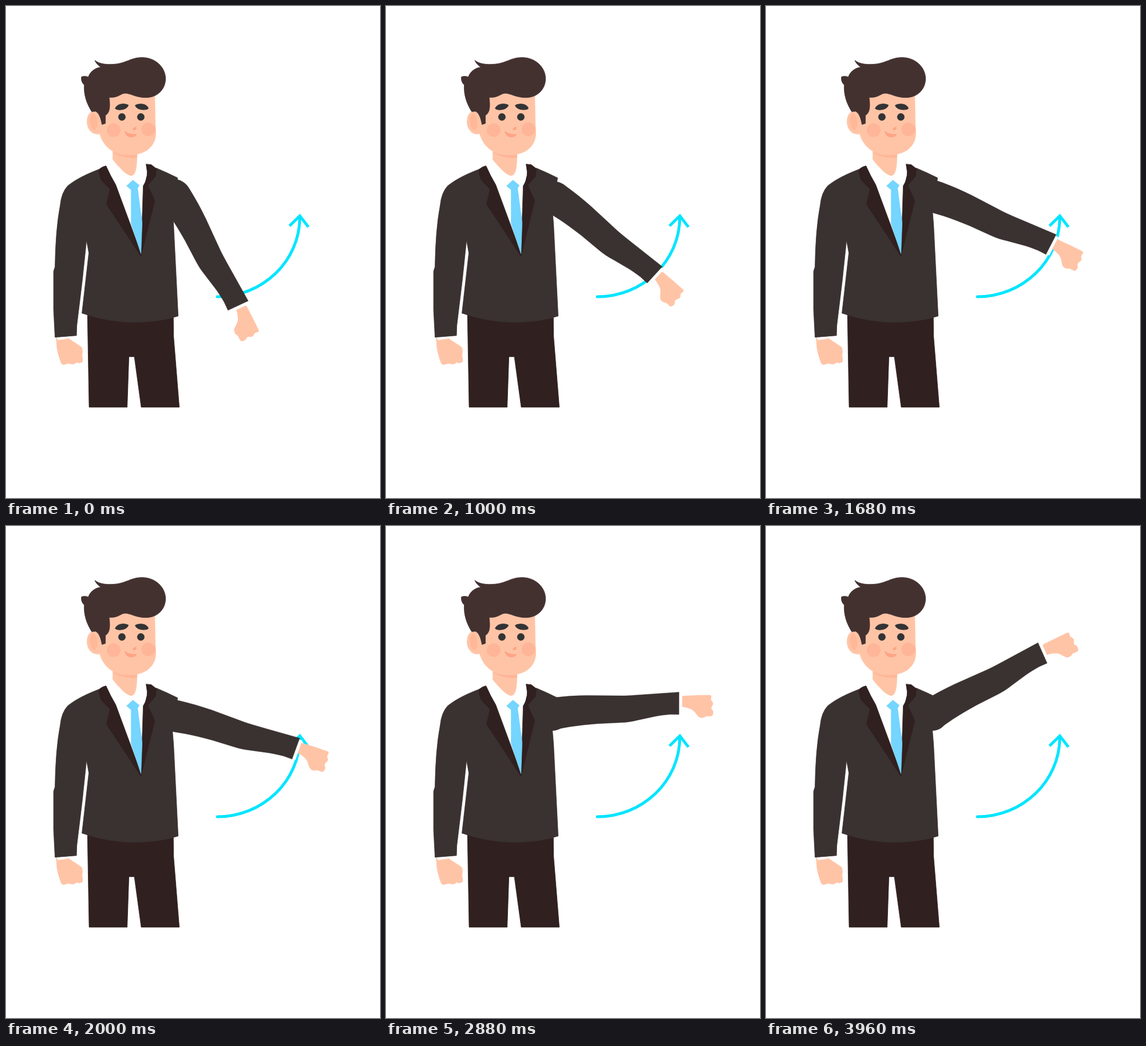
An HTML page with a canvas that plays this animation: 653x858 px, repeating every 4 s.

```html
<!DOCTYPE html>
<html lang="en">
<head>
<meta charset="utf-8">
<title>Raising an arm</title>
<style>
html, body { margin: 0; width: 100%; height: 100%; overflow: hidden; background: #fff; }
canvas { display: block; }
</style>
</head>
<body>
<canvas id="stage" width="653" height="858"></canvas>
<script>
const ctx = document.getElementById('stage').getContext('2d');

const LOOP = 4000, STEP = 40;
const PIVOT = { x: 291.2, y: 331.6 };
const JACKET = '#3a3230', DARK = '#302020', HAIR = '#433130', INK = '#333335';
const SKIN = '#ffc4a6', BLUSH = '#ffb598', PINK = '#ffa486', TIE = '#74d5ff', CYAN = '#00e5ff';

// Fills a path; a thin outline in the same colour keeps its edges full.
const fill = (color, d, edge = 0.8) => {
  const path = new Path2D(d);
  ctx.fillStyle = ctx.strokeStyle = color;
  ctx.lineWidth = edge;
  ctx.fill(path);
  if (edge) ctx.stroke(path);
};

const oval = (color, x, y, rx, ry = rx, turn = 0) => {
  ctx.fillStyle = color;
  ctx.beginPath();
  ctx.ellipse(x, y, rx, ry, turn, 0, Math.PI * 2);
  ctx.fill();
};

function drawArrow() {
  ctx.strokeStyle = CYAN;
  ctx.lineWidth = 5;
  ctx.lineJoin = 'miter';
  ctx.lineCap = 'round';
  ctx.stroke(new Path2D('M369 507C448 507 513 445 513 368'));
  ctx.lineCap = 'butt';
  ctx.stroke(new Path2D('M495 383.5L513 366L528 385.5'));
}

// The arm is described in its horizontal pose and turned about the shoulder,
// which sinks a little in the first half and rises again.
function drawArm(p) {
  const degrees = 65 - 90 * p;
  const dip = 1 + 62 * p * (1 - p) * (0.63 - p);
  ctx.save();
  ctx.translate(PIVOT.x, PIVOT.y + dip);
  ctx.rotate(degrees * Math.PI / 180);
  ctx.translate(-PIVOT.x, -PIVOT.y);
  fill('#fff', 'M510 291.5H517.5V327H510Z', 0);
  fill(SKIN, `M517 297Q517 295.5 520 295.3L545 294.3L565 294Q568 294 568 297Q567 301 567.5 303
    Q571 306 571 310Q568 314 568 318Q571.5 321 571.5 325Q571 331 567 331L559 331
    Q555 334.5 550 333.8Q546 333.5 541.5 327Q537 320.5 532 318.5Q525 315.5 517 314.5Z`, 0);
  fill(JACKET, `M262 320Q272 300 293 299.3Q320 296 350 295.5L412 295.8Q425 295.5 450 293.5L511.5 289
    V328L496 328Q480 329.5 470 331.5L440 338Q425 342 411 342.5L370 344.5Q340 347 322 350
    Q311 352 303 353.5Q290 357 278 352Z`, 0.4);
  ctx.restore();
  oval(JACKET, PIVOT.x, PIVOT.y, 25.4);
}

function drawBody() {
  fill(DARK, 'M142.5 530H292.5L293 576L303 700H236.5L224.5 612H215L212 700H145.5Z');
  fill(SKIN, `M88 578L91 583.5L110 580.5Q120 587 132 595Q135 600 133 610Q135.5 618 133 621.5
    Q128 624 124 621.5Q119 626 114 624.5Q109 622.5 106 624.5Q99 627 97 623.5Q91 607 89.5 597Z`);
  fill(JACKET, `M163 285C142 293 123 302 108 314Q97 326 95 348Q87 390 86 455L83.5 463V530L86 578
    L123.5 575L124 558L133.5 480L141 409L145 431L133 536Q180 552 227 552Q270 551 301 541
    L293 381L291 357L300 300Q282 291 263 283L246 290L236 437L180 300Z`);
  fill('#fff', 'M175 279L192 312L236 432L240 313L247 295L245 276L230 268L187 270Z', 0);
  fill(DARK, 'M163 285Q169 280 175 279Q183 297 192 312L236 431V437L176 346L182 320L167 304Q162 293 163 285Z');
  fill(DARK, 'M245 276L254 277L263 284Q262 294 261 298L248 313L260 340L236 437L240 314Q247 303 247 290Z');
  fill(TIE, 'M219 318H230L238 378L236 432L219 380Z');
  fill(TIE, 'M222 304L233 313L229 320L219 321L211 314Z');
}

function drawHead() {
  fill(SKIN, 'M187 250V268Q193 276 205 288Q214 296 220 296Q224 295 226 289Q229 280 229 262V250Z');
  fill(BLUSH, 'M188 256Q205 266 229 264.5V256Z');

  const face = `M166 150H260L261 205L262 220C262 246 244 260 213 260C187 260 170 244 164 223
    C152 226 142 216 142 202C142 190 148 183 156 184Z`;
  fill(SKIN, face);
  oval('#ffb898', 153.5, 202.5, 6.5, 14, -0.08);

  ctx.save();
  ctx.clip(new Path2D(face));
  oval(BLUSH, 188.3, 216.8, 12);
  oval(BLUSH, 248.8, 215.3, 12);
  ctx.restore();

  fill(HAIR, `M155.5 95C163 101 173 102 182 102C210 102 216 90 238 90C261 90 279 107 279 127
    C279 146 264 160 245 160C226 160 219 152.5 208 152.5C200 153 196 161 180.5 159.5
    C182 172 183 186 174 191L174 205L168 207C166 196 163 187 157 184L150 184.5
    C141 170 136 155 137 138C133 134 131.5 130 132 124C137 122 140 123 144 124
    C148 113.5 157 108 166 107C160 103 157 99 155.5 95Z`);

  fill(INK, 'M191 179C194 171 206 169 214 173C213 181 196 184 191 179Z');
  fill(INK, 'M226 173.5C234 169 247 171 249 179C245 183 228 182 226 173.5Z');
  oval(INK, 202.8, 193.8, 6.5);
  oval(INK, 235.8, 193.8, 6.5);
  fill(PINK, 'M227.5 211Q230 216.5 222 216.5Q221 213.5 227.5 211Z');
  fill(PINK, 'M208 219Q217 225 228.5 224Q225 230 217 229Q209 227 208 219Z');
}

function frame(now) {
  const t = Math.floor((now % LOOP) / STEP) * STEP;
  ctx.fillStyle = '#fff';
  ctx.fillRect(0, 0, 653, 858);
  drawArrow();
  drawArm(t / LOOP);
  ctx.save();
  ctx.translate(-0.4, -0.3);
  drawBody();
  drawHead();
  ctx.restore();
}

const start = performance.now();
function tick() {
  frame(performance.now() - start);
  requestAnimationFrame(tick);
}
tick();
</script>
</body>
</html>
```
